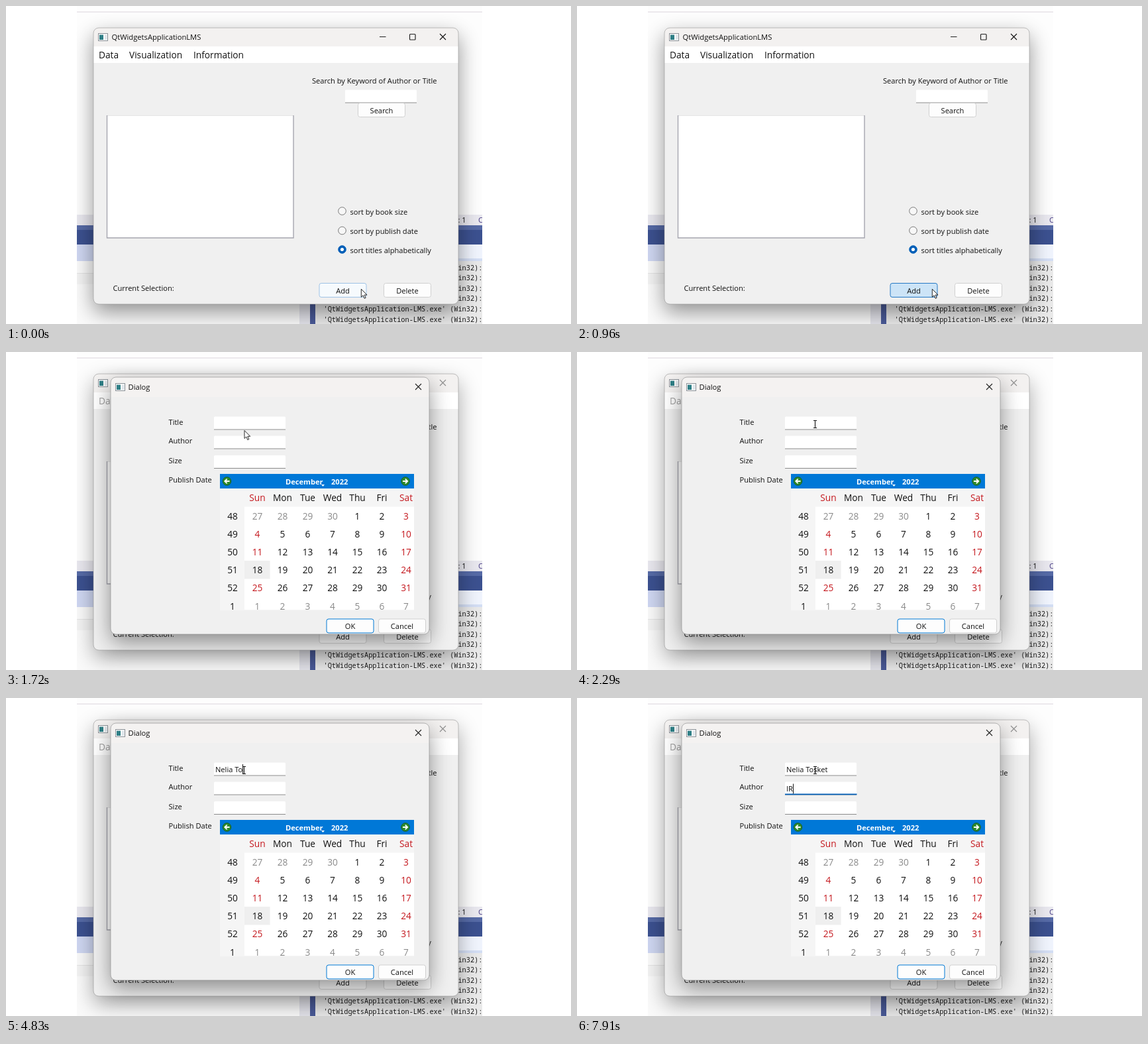
An HTML page that plays this animation: 853x480 px, repeating every 8 s.

```html
<!DOCTYPE html>
<html lang="en">
<head>
<meta charset="utf-8">
<title>Library dialog</title>
<style>
html, body { margin: 0; width: 100%; height: 100%; overflow: hidden; background: #fff; }
svg { display: block; width: 100vw; height: 100vh; }
text { font: 11.1px "Open Sans", "Noto Sans", sans-serif; fill: #111; white-space: pre; }
.title { font-size: 11.2px; }
.big { font-size: 13.7px; }
.bold { font-weight: 700; fill: #fff; }
.mono { font: 10.25px "Noto Sans Mono", "DejaVu Sans Mono", monospace; fill: #1c1c1c; }
.mid { text-anchor: middle; }
</style>
</head>
<body>
<svg id="stage" viewBox="0 0 853 480" xmlns="http://www.w3.org/2000/svg"></svg>
<script>
const LOOP = 8000;
const BOOK = "Nelia Tosket";
const WRITER = "IR";
// times at which each letter appears
const BOOK_KEYS = [2950, 3130, 3280, 3440, 3690, 3960, 4260, 4640, 4920, 5210, 5530, 5850];
const WRITER_KEYS = [7720, 7910];

const rect = (x, y, w, h, fill, more = "") =>
  `<rect x="${x}" y="${y}" width="${w}" height="${h}" fill="${fill}" ${more}/>`;
const text = (x, y, s, cls = "", more = "") =>
  `<text x="${x}" y="${y}" class="${cls}" ${more}>${s}</text>`;
const path = (d, stroke, more = "") =>
  `<path d="${d}" fill="none" stroke="${stroke}" ${more}/>`;

const field = (x, y) =>
  rect(x, y, 108, 20, "#fff", 'rx="1.5"') + path(`M${x} ${y + 19.5}h108`, "#8a8a8a");

const button = (x, y, w, label, stroke = "#d0d0d0", id = "") =>
  rect(x + .5, y + .5, w - 1, 21, "#fdfdfd", `rx="3" stroke="${stroke}" ${id && `id="${id}"`}`) +
  text(x + w / 2, y + 15.5, label, "mid");

const radio = (y, label, on) =>
  `<circle cx="507.5" cy="${y}" r="5.8" fill="${on ? "#005fb8" : "#f7f7f7"}" stroke="${on ? "#005fb8" : "#777"}"/>` +
  (on ? `<circle cx="507.5" cy="${y}" r="2.6" fill="#fff"/>` : "") +
  text(519.5, y + 5, label);

const appIcon = (x, y) =>
  rect(x + .5, y + .5, 14, 11, "#fafafa", 'stroke="#8b9298"') +
  rect(x + 2, y + 2.5, 6, 7.5, "#2f7f86") + rect(x + 10, y + 2.5, 3.5, 7.5, "#dfe5ea");

const cross = (x, y, id) =>
  path(`M${x - 4.5} ${y - 4.5}l9 9m0 -9l-9 9`, "#222", `stroke-width="1.1" id="${id}"`);

const shadow = (x, y, w, h, id) =>
  rect(x, y + 12, w, h, "#000", `rx="8" opacity=".42" filter="url(#blur)" id="${id}"`);

function desktop() {
  let s = rect(107, 0, 612, 480, "#fdfdfd") + path("M107 9h612", "#e7e3e9", 'stroke-width="1.5"');
  s += rect(107, 315, 612, 16, "#e9e8ef") + rect(107, 331, 612, 7, "#566aa6") + rect(107, 338, 612, 22, "#3c5190");
  s += rect(107, 360, 336, 25, "#cfd7f2") + rect(443, 360, 276, 22, "#f0f4fd") + rect(443, 381, 276, 4, "#d3def4");
  s += rect(107, 385, 336, 95, "#fafafa") + rect(107, 403, 336, 17, "#f3f3f3") + path("M107 403.5h336", "#e4e4e4");
  s += rect(443, 385, 16, 95, "#e3e3ea") + rect(459, 385, 8, 95, "#4a5a98") + rect(467, 385, 252, 95, "#e9e9e9");
  s += text(682.5, 327, ": 1") + text(713, 327, "Ch", "", 'style="fill:#4a3f86"');
  for (let i = 0; i < 6; i++)
    s += text(479.5, 476.5 - i * 15.6, "'QtWidgetsApplication-LMS.exe' (Win32):", "mono");
  return s;
}

function mainWindow() {
  let s = shadow(132, 33, 551, 417, "mainShadow");
  s += rect(132, 33, 551, 417, "#f0f0f0", 'rx="8"');
  s += '<path d="M132 61v-20a8 8 0 0 1 8 -8h535a8 8 0 0 1 8 8v20z" fill="#f3f1f0"/>';
  s += rect(132, 61, 551, 25, "#fff");
  s += rect(132, 33, 551, 417, "none", 'rx="8" stroke="#8f8f8f" stroke-opacity=".55"');
  s += appIcon(139, 41) + text(159.5, 51, "QtWidgetsApplicationLMS", "title", 'id="mainTitle"');
  s += path("M564 46.5h9.5", "#222") + rect(609.5, 42.5, 8.5, 8.5, "none", 'rx="1" stroke="#222" stroke-width="1.2"');
  s += cross(659.5, 46.5, "mainClose");
  s += '<g id="menu">' + text(140, 79, "Data", "big") + text(186, 79, "Visualization", "big") +
    text(283, 79, "Information", "big") + "</g>";
  s += text(462, 116.5, "Search by Keyword of Author or Title") + field(512, 126.5) + button(531, 146, 72, "Search");
  s += rect(152, 165, 282, 185, "#fff") + path("M152 165.5h282", "#e6e6e6") +
    path("M152.5 165v185h281.5v-185", "#a5a5af", 'stroke-width="1.4"');
  s += radio(309.5, "sort by book size") + radio(339, "sort by publish date") +
    radio(367.5, "sort titles alphabetically", true);
  s += text(161.5, 430, "Current Selection:");
  s += button(472.5, 418, 72, "Add", "#9fc3e6", "add") + button(570, 418, 72, "Delete");
  return s;
}

function calendar() {
  const cols = [342, 379.5, 417.5, 455.5, 493, 530.5, 567.5, 604];
  const weeks = [48, 49, 50, 51, 52, 1];
  const red = "#c4161c";
  const put = (c, y, s, color) => text(cols[c], y, s, "big mid", `style="fill:${color}"`);
  const arrow = (x, dir) =>
    `<circle cx="${x}" cy="195" r="6.3" fill="#2c8a2c" stroke="#1c5f2a"/>` +
    path(`M${x - 4 * dir} 195h${7 * dir}m${-3.2 * dir} -3.3l${3.4 * dir} 3.3l${-3.4 * dir} 3.3`, "#fff", 'stroke-width="1.8"');
  let s = rect(323, 206, 293, 183.5, "#fff") + rect(323, 206, 293, 27.5, "#f5f5f5") +
    rect(323, 206, 37, 183.5, "#f5f5f5") + rect(360, 315, 38.5, 27.5, "#efefef");
  s += rect(323, 184, 293, 22, "#0078d7") + arrow(333.5, -1) + arrow(603, 1);
  s += text(422, 199.5, "December", "bold") + text(491, 199.5, "2022", "bold") +
    '<path d="M476 200h5l-2.5 3z" fill="#fff"/>';
  ["Sun", "Mon", "Tue", "Wed", "Thu", "Fri", "Sat"].forEach((d, i) => {
    s += put(i + 1, 225, d, i % 6 ? "#111" : red);
  });
  weeks.forEach((week, r) => {
    const y = 252.5 + r * 27.2;
    s += put(0, y, week, "#111");
    for (let c = 0; c < 7; c++) {
      const n = r * 7 + c - 3;
      const day = n < 1 ? n + 30 : n > 31 ? n - 31 : n;
      const color = day !== n ? "#8a8a8a" : c % 6 === 0 && n !== 18 ? red : "#111";
      s += put(c + 1, y, day, color);
    }
  });
  return `<g clip-path="url(#month)">${s}</g>`;
}

function dialog() {
  let s = shadow(158, 38, 481, 388, "dialogShadow") + rect(158, 38, 481, 388, "#f0f0f0", 'rx="8" id="dialogBody"');
  s += '<path d="M158 68v-22a8 8 0 0 1 8 -8h465a8 8 0 0 1 8 8v22z" fill="#f4f2f1"/>';
  s += rect(158, 38, 481, 388, "none", 'rx="8" stroke="#8a8a8a" stroke-opacity=".6"');
  s += appIcon(165, 47) + text(184.5, 57, "Dialog", "title") + cross(622.5, 52.5, "dialogClose");
  s += '<g id="form">';
  s += text(245.5, 109.5, "Title") + text(245.5, 138, "Author") + text(245.5, 167.5, "Size") + text(245.5, 196.5, "Publish Date");
  s += field(314, 97.5) + field(314, 126.5) + field(314, 156);
  s += path("M314 145.3h108.5", "#005fb8", 'stroke-width="1.7" id="focus"');
  s += text(316, 111.5, "", "", 'id="book"') + text(316, 141, "", "", 'id="writer"');
  s += rect(0, 100, 1, 15, "#111", 'id="caret"');
  s += calendar() + button(483.5, 402.5, 72, "OK", "#0078d4") + button(562, 402.5, 72, "Cancel");
  return `<g id="dialog">${s}</g></g>`;
}

const cursors =
  '<path id="arrow" d="M0 0v12l2.8 -2.5l2 4.6l2 -.9l-2 -4.4h3.9z" fill="#fff" stroke="#111" stroke-width=".9"/>' +
  '<path id="resize" d="M537 420l3.5 4h-2.3v7h2.3l-3.5 4l-3.5 -4h2.3v-7h-2.3z" fill="#fff" stroke="#111" stroke-width=".9"/>' +
  path("M-2.5 -5.5h2l.5 .5l.5 -.5h2M0 -5v10M-2.5 5.5h2l.5 -.5l.5 .5h2", "#111", 'id="beam" stroke-width="1.1"');

const stage = document.getElementById("stage");
stage.innerHTML =
  `<defs><filter id="blur" x="-20%" y="-20%" width="140%" height="140%"><feGaussianBlur stdDeviation="16"/></filter>
  <clipPath id="screen"><rect x="107" y="0" width="612" height="480"/></clipPath>
  <clipPath id="month"><rect x="323" y="184" width="293" height="205.5"/></clipPath></defs>
  <g clip-path="url(#screen)">${desktop()}${mainWindow()}${dialog()}${cursors}</g>`;

const ui = {};
stage.querySelectorAll("[id]").forEach(e => ui[e.id] = e);
const set = (e, name, value) => e.setAttribute(name, value);
const show = (e, on) => set(e, "visibility", on ? "inherit" : "hidden");
const part = (t, a, b) => Math.min(1, Math.max(0, (t - a) / (b - a)));
const ease = p => p * p * (3 - 2 * p);
const lerp = (a, b, p) => a + (b - a) * p;
const mix = (a, b, p) => `rgb(${a.map((v, i) => Math.round(lerp(v, b[i], p)))})`;
const typed = (s, keys, t) => s.slice(0, keys.filter(k => k <= t).length);

function drawMain(t) {
  const open = t >= 1090, settled = t >= 1180;
  const gray = open ? "#8f8f8f" : "#111";
  ui.mainTitle.style.fill = gray;
  set(ui.mainClose, "stroke", gray);
  ui.menu.querySelectorAll("text").forEach(e => e.style.fill = settled ? "#a0a0a0" : "#111");
  set(ui.mainShadow, "opacity", lerp(.42, .34, part(t, 1090, 1300)));
  const p = part(t, 500, 650);
  set(ui.add, "fill", settled ? "#fdfdfd" : mix([246, 250, 253], [204, 228, 247], p));
  set(ui.add, "stroke", settled ? "#d0d0d0" : mix([159, 195, 230], [37, 121, 196], p));
}

function drawDialog(t) {
  const grow = part(t, 1100, 1200);
  const x = lerp(397, 398.5, grow), k = lerp(.981, 1, grow);
  show(ui.dialog, t >= 1090);
  set(ui.dialog, "transform", `translate(${x} 232) scale(${k}) translate(-398.5 -232)`);
  const ready = t >= 1180;
  set(ui.dialogBody, "fill", ready ? "#f0f0f0" : "#fefefe");
  show(ui.form, ready);

  ui.book.textContent = typed(BOOK, BOOK_KEYS, t);
  ui.writer.textContent = typed(WRITER, WRITER_KEYS, t);
  const second = t >= 6880;
  show(ui.focus, ready && second);
  const line = second ? ui.writer : ui.book;
  const width = line.textContent ? line.getComputedTextLength() : 0;
  set(ui.caret, "x", Math.round(316 + width));
  set(ui.caret, "y", second ? 129.5 : 100);
  const blinkOff = (t >= 6430 && t < 6880) || (t >= 7530 && t < 7720);
  show(ui.caret, ready && t >= 2300 && !blinkOff);
}

function drawCursor(t) {
  const a = ease(part(t, 1230, 1680)), b = ease(part(t, 1800, 1990));
  const x = lerp(lerp(536.3, 360, a), 359.5, b);
  const y = lerp(lerp(427.3, 118.5, a), 109, b);
  const sizing = t >= 1090 && t < 1230, inField = t >= 1850;
  show(ui.resize, sizing);
  show(ui.beam, inField);
  show(ui.arrow, !sizing && !inField);
  set(ui.arrow, "transform", `translate(${x} ${y})`);
  set(ui.beam, "transform", `translate(${x} ${y})`);
}

const start = performance.now();
function frame(now) {
  const t = Math.max(0, now - start) % LOOP;
  drawMain(t);
  drawDialog(t);
  drawCursor(t);
  requestAnimationFrame(frame);
}
frame(start);
</script>
</body>
</html>
```
